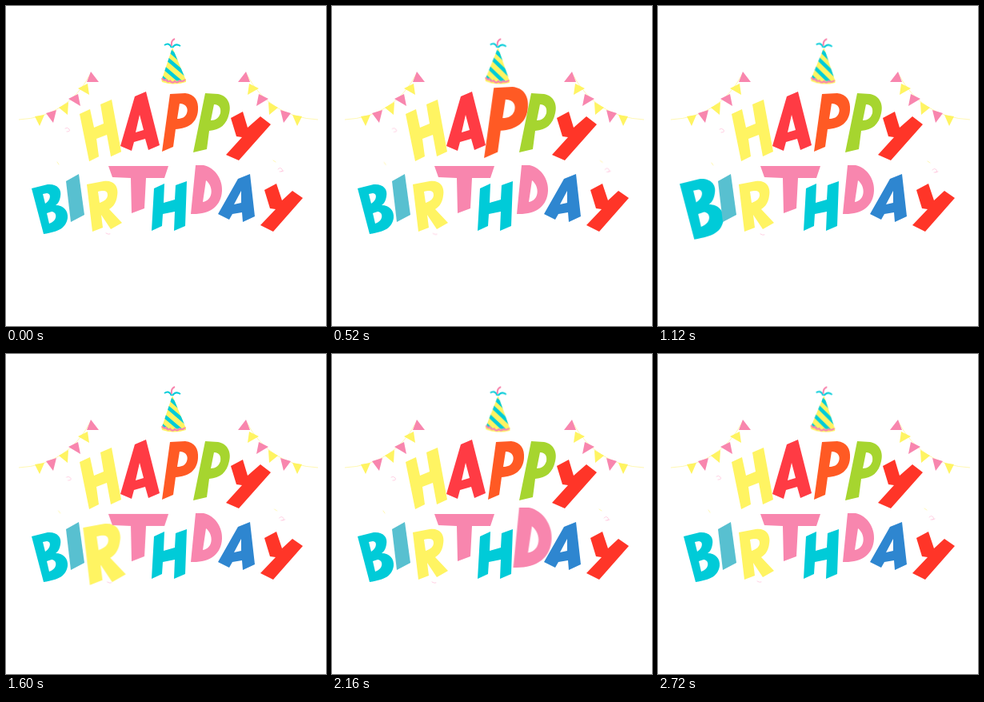
Animation of 400x400 px, one loop 2.76 s. Source, as an HTML page:

```html
<!DOCTYPE html>
<html lang="en">
<head>
<meta charset="utf-8">
<title>Happy Birthday</title>
<style>
  html, body { margin: 0; width: 100%; height: 100%; overflow: hidden; background: #fff; }
  svg { display: block; width: 100vw; height: 100vh; }
  .yellow { fill: #fff462; }
  .pink { fill: #f886ae; }
  .cyan { fill: #00cbd8; }
  .red { fill: #ff3528; }

  #letters path {
    fill-rule: evenodd;
    transform-box: fill-box;
    transform-origin: center;
    animation: pop 2760ms calc(var(--i) * 200ms) infinite;
  }
  @keyframes pop {
    0% { transform: scale(1); animation-timing-function: cubic-bezier(.39, .575, .565, 1); }
    5.8% { transform: scale(1.23); animation-timing-function: cubic-bezier(.47, 0, .745, .715); }
    11.6%, 100% { transform: scale(1); }
  }

  #hat { transform-origin: 208px 45px; animation: sway 2760ms cubic-bezier(.37, 0, .63, 1) infinite; }
  @keyframes sway {
    0%, 28.99%, 57.97%, 86.96% { transform: rotate(0deg); }
    14.49%, 43.48%, 72.46%, 100% { transform: rotate(4.5deg); }
  }

  #confetti { fill: none; stroke-width: .8; stroke-linecap: round; animation: drift 2760ms ease-in-out infinite; }
  @keyframes drift {
    0% { transform: translate(0, 0); }
    42% { transform: translate(3px, 1px); }
    75% { transform: translate(0, 1px); }
    100% { transform: translate(-1px, 0); }
  }
</style>
</head>
<body>
<svg viewBox="0 0 400 400">
  <defs>
    <clipPath id="cone"><path d="M208 52L195 91Q210 99 225 93Z"/></clipPath>
    <g id="bunting">
      <path d="M16 142Q77 139 106 84" fill="none" stroke="#fff7a0" stroke-width=".8"/>
      <path class="yellow" d="M36 138L48 136 42 150ZM66 127L78 120 77 136ZM90 103L102 97 104 111Z"/>
      <path class="pink" d="M50 134L63 130 59 146ZM78 116L90 110 93 125ZM106 82L116 95 101 95Z"/>
    </g>
  </defs>

  <use href="#bunting"/>
  <use href="#bunting" transform="translate(406) scale(-1 1)"/>

  <g id="hat">
    <g clip-path="url(#cone)">
      <path class="yellow" d="M190 45H230V100H190Z"/>
      <path d="M198 50L222 71M192 58L226 87M188 69L222 98M184 80L210 102" stroke="#00cbd8" stroke-width="4.6"/>
    </g>
    <path class="yellow" d="M194 91Q210 97 225 91L225 95Q210 100 195 95Z"/>
    <path d="M195 90q2 4 5 2q2 4 5 1.500q3 4 6 .5q3 3 6-.5q3 2 7-1.500" fill="none" stroke="#f886ae" stroke-width="2.200"/>
    <path d="M207 52Q204 45 198 49M208 52Q212 46 218 50" fill="none" stroke="#00cbd8" stroke-width="2"/>
    <path d="M207 50Q206 43 211 41" fill="none" stroke="#f886ae" stroke-width="2"/>
  </g>

  <g id="confetti">
    <path d="M74 153q3-2 5 1t-3 3M340 204q3-3 5 0t-3 3M344 207l3-1M125 284q3 2 5 1" stroke="#ffc4dc"/>
    <path d="M64 195l2 3M334 193l3 2" stroke="#fff7a0"/>
  </g>

  <g id="letters">
    <path class="yellow" d="M92 135L105 129 110 152 122 147 118 123 132 117 144 182 131 188 126 161 113 166 116 188 104 194Z"/>
    <path fill="#ff3b44" d="M161 113L175 107 192 174 178 180 174 166 160 170 157 181 143 175ZM167 136L172 155 162 158Z"/>
    <path fill="#ff5a24" d="M205 110L224 109C236 110 241 119 240 130C239 146 228 153 212 154L209 176 195 182ZM217 122L214 141C220 141 224 139 226 134C228 129 226 122 217 122Z"/>
    <path fill="#a6d52f" d="M249 109L265 110C277 112 282 123 279 134C276 148 268 155 254 156L251 179 234 183ZM260 123L256 143C262 143 266 140 268 134C269 128 267 123 260 123Z"/>
    <path class="red" d="M281 140L296 132 302 152 318 138 331 148 291 193 275 186 295 164 288 163Z"/>
    <path class="cyan" d="M32 228L52 223C64 222 70 229 68 238C67 244 65 247 62 249C72 249 78 256 77 265C75 277 67 282 47 285ZM46 235L49 247C56 243 57 234 51 234ZM51 259L54 272C64 269 65 258 57 257Z"/>
    <path fill="#58c0d0" d="M75 219L91 210 98 261 81 270Z"/>
    <path class="yellow" d="M101 223L122 219C136 217 141 227 139 237C138 246 134 251 129 254L145 271 131 279 119 261 121 277 108 282ZM115 232L117 246C123 244 127 241 127 236C127 231 123 230 115 232Z"/>
    <path class="pink" d="M128 200H203L198 215H175L173 253 157 259 156 215 133 214Z"/>
    <path class="cyan" d="M185 228L198 222 197 246 211 242 212 224 226 219 224 275 210 281 211 257 196 260 195 275 182 281Z"/>
    <path class="pink" d="M237 199L247 199C262 202 271 218 270 231C269 251 254 261 231 260ZM250 218L246 245C259 243 260 226 250 218Z"/>
    <path fill="#2e86d0" d="M290 216L305 210 311 263 296 270 295 258 283 260 279 267 265 260ZM294 231L285 248 294 246Z"/>
    <path class="red" d="M323 230L338 222 345 243 358 231 371 240 334 282 318 274 337 254 330 253Z"/>
  </g>
</svg>
<script>
  document.querySelectorAll('#letters path').forEach((p, i) => p.style.setProperty('--i', i));
</script>
</body>
</html>
```
